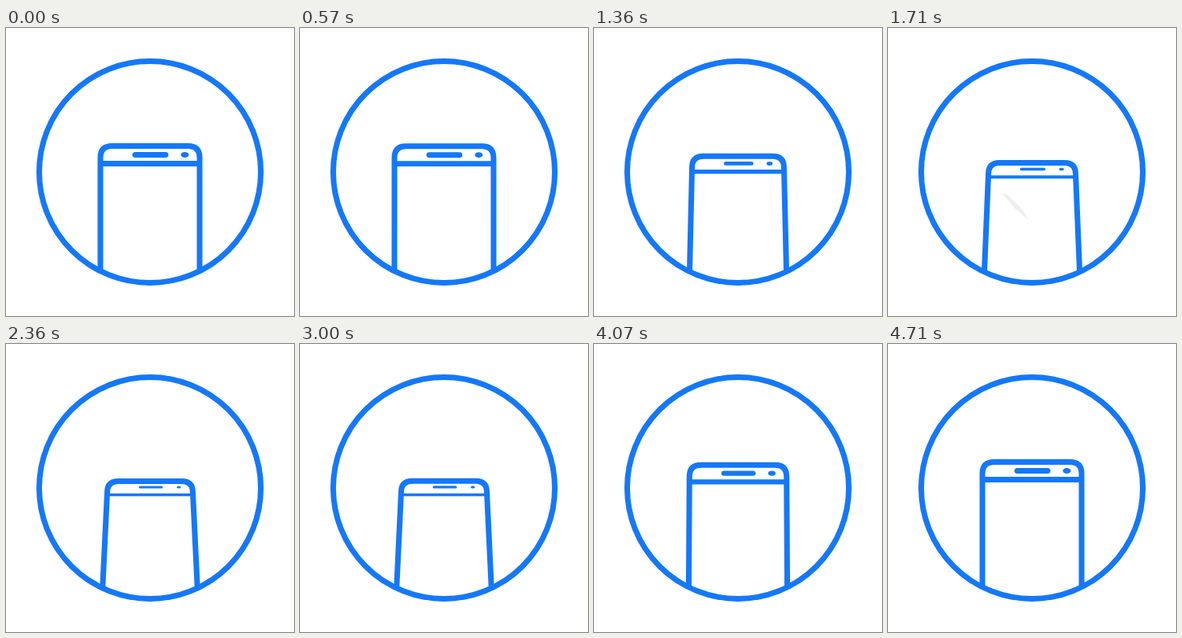
An HTML page for the animation above (4780 ms loop, 360 by 360 pixels).

```html
<!DOCTYPE html>
<html lang="en">
<head>
<meta charset="utf-8">
<title>Tilting phone</title>
<style>
  html, body { margin: 0; width: 100%; height: 100%; overflow: hidden; background: #fff; }
  svg { display: block; width: 100vw; height: 100vh; }
  .line { fill: none; stroke: #1478fa; }
  #slot { stroke-linecap: round; }
  #dot { fill: #1478fa; }
  #glint { fill: #efefef; }
</style>
</head>
<body>
<svg viewBox="0 0 360 360">
  <clipPath id="inside"><circle cx="180" cy="180" r="138.5"/></clipPath>
  <g clip-path="url(#inside)">
    <path id="glint" d="M142 206 L150 209 L169 228 L176.5 241 L158 225 Z"/>
    <path id="body" class="line" stroke-width="7"/>
    <path id="bar" class="line"/>
    <path id="slot" class="line"/>
    <ellipse id="dot"/>
  </g>
  <circle class="line" cx="180" cy="180" r="138.5" stroke-width="7"/>
</svg>
<script>
  const LOOP = 4780, STEP = LOOP / 67;
  const [glint, body, bar, slot, dot] =
    ['glint', 'body', 'bar', 'slot', 'dot'].map(id => document.getElementById(id));

  const ease = u => {
    u = Math.min(1, Math.max(0, u));
    return u < 0.5 ? 4 * u ** 3 : 1 - 4 * (1 - u) ** 3;
  };
  const set = (el, attrs) => {
    for (const name in attrs) el.setAttribute(name, attrs[name]);
  };

  // Tilt back, rest, tilt upright again
  const tiltAt = t => ease((t - 330) / 2005) - ease((t - 2775) / 1945);

  function draw(t) {
    const p = tiltAt(t);
    const mix = (a, b) => a + (b - a) * p;

    const top = mix(147.5, 171.5);
    const side = mix(62, 53.5);
    const foot = mix(62, 59.3);
    const r = mix(14.5, 14);
    const l = 180 - side, rt = 180 + side;
    set(body, {
      d: `M${180 - foot} 306 L${l} ${top + r} Q${l} ${top} ${l + r} ${top}` +
         ` H${rt - r} Q${rt} ${top} ${rt} ${top + r} L${180 + foot} 306`
    });

    set(bar, { d: `M${l} ${mix(169.5, 188.5)} H${rt}`, 'stroke-width': mix(7, 3.5) });

    const y = mix(158.5, 179);
    set(slot, {
      d: `M${mix(161.5, 167.5)} ${y} H${mix(199.5, 194.5)}`,
      'stroke-width': mix(7, 3)
    });
    set(dot, { cx: mix(223.5, 216), cy: y, rx: mix(5, 2.7), ry: mix(3.5, 1.6) });

    set(glint, { opacity: Math.max(0, 1 - Math.abs(t - 1712) / 110) });
  }

  function tick() {
    const t = performance.now() % LOOP;
    draw(Math.floor(t / STEP + 0.1) * STEP);
    requestAnimationFrame(tick);
  }
  tick();
</script>
</body>
</html>
```
